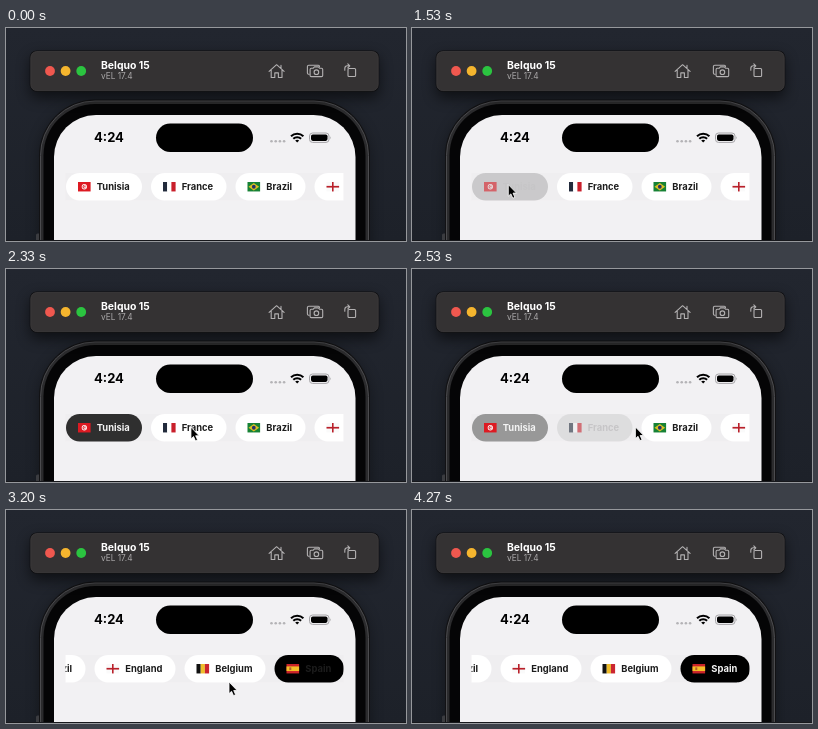
Animation of 400 by 213 pixels, one loop 5.74 s. Source, as an HTML page:

```html
<!DOCTYPE html>
<html lang="en">
<head>
<meta charset="utf-8">
<style>
  html, body { margin: 0; height: 100%; overflow: hidden; background: #20242d; }
  svg { display: block; width: 100vw; height: 100vh; font-family: Inter, "Liberation Sans", sans-serif; }
  .icon { fill: none; stroke: #b3b1b2; stroke-width: 1.1; stroke-linejoin: round; stroke-linecap: round; }
</style>
</head>
<body>
<svg viewBox="0 0 400 213">
  <defs>
    <linearGradient id="wall" x2="0" y2="1">
      <stop stop-color="#22262f"/><stop offset="1" stop-color="#1d2129"/>
    </linearGradient>
    <filter id="blur" x="-20%" y="-80%" width="140%" height="260%"><feGaussianBlur stdDeviation="7"/></filter>
    <clipPath id="list"><rect x="59.5" y="140" width="278" height="40"/></clipPath>
  </defs>
  <rect width="400" height="213" fill="url(#wall)"/>

  <!-- Phone -->
  <rect x="33" y="76" width="331" height="300" rx="55" opacity=".35" filter="url(#blur)"/>
  <rect x="30" y="205.5" width="5" height="20" rx="1.5" fill="#3b3c40"/>
  <rect x="33" y="71.5" width="331" height="300" rx="56" fill="#121214"/>
  <rect x="34.5" y="73" width="328" height="300" rx="54.5" fill="#2b2b2d" stroke="#4b4b4e"/>
  <rect x="37.5" y="76" width="322" height="300" rx="51.5" fill="#050506"/>
  <rect x="48" y="87" width="301.5" height="300" rx="42" fill="#f2f1f3"/>
  <rect x="59.5" y="145" width="278" height="27.4" fill="#efeef0"/>
  <rect x="150" y="95.5" width="97" height="28.5" rx="14.25"/>
  <text x="88" y="114.2" font-size="13" font-weight="650">4:24</text>
  <g id="dots" fill="#b4b3b6"></g>
  <g fill="none" stroke="#000" stroke-width="2">
    <path d="M285 108.2a8.8 8.8 0 0 1 12.4 0M287.3 110.8a5.6 5.6 0 0 1 7.8 0"/>
    <path d="M291.2 114.6l-2-2a2.9 2.9 0 0 1 4 0z" fill="#000" stroke="none"/>
  </g>
  <rect x="303.5" y="105" width="19.5" height="9.4" rx="3" fill="none" stroke="#a5a4a7"/>
  <rect x="305" y="106.5" width="16.5" height="6.4" rx="1.8"/>
  <path d="M324.2 108.2q1.4 1.5 0 3z" fill="#a5a4a7"/>

  <!-- Toolbar -->
  <rect x="24" y="28" width="349" height="42" rx="7" opacity=".55" filter="url(#blur)"/>
  <rect x="23.7" y="22.5" width="349.6" height="41.2" rx="7" fill="#0f0f11"/>
  <rect x="24.8" y="23.6" width="347.4" height="39" rx="6" fill="#343233" stroke="#403e3f" stroke-width=".8"/>
  <circle cx="44" cy="43" r="4.9" fill="#f0584f"/>
  <circle cx="59.6" cy="43" r="4.9" fill="#f5b52e"/>
  <circle cx="75.2" cy="43" r="4.9" fill="#2bc440"/>
  <text x="95" y="40.8" font-size="10.4" font-weight="700" fill="#fff">Belquo 15</text>
  <text x="95" y="51.3" font-size="8.3" fill="#aba9aa">vEL 17.4</text>
  <g class="icon">
    <path d="M263.1 43.3l7.5-6.6 7.5 6.6M265.2 42v7.5h3.6v-4.6h3.6v4.6h3.6V42M275 40.2v-2.8"/>
    <path d="M303.2 46.3h-.6q-1.2 0-1.2-1.2v-6.6q0-1.3 1.3-1.3h9.6q1.2 0 1.2 1.2"/>
    <path d="M305.3 40.2h2l1.1-1.3h4l1.1 1.3h2q1.2 0 1.2 1.2v6q0 1.2-1.2 1.2h-10.2q-1.2 0-1.2-1.2v-6q0-1.2 1.2-1.2z"/>
    <circle cx="310.4" cy="44.2" r="2.3"/>
    <rect x="342" y="40.5" width="7.6" height="8" rx="1"/>
    <path d="M338.8 42.2v-1.7q0-2.7 2.7-2.7h2M341.8 35.8l2 2-2 2"/>
  </g>

  <g clip-path="url(#list)"><g id="row"></g></g>
  <path id="cursor" d="M0 0V11.6L2.6 9.3 4.5 13.6 6.6 12.7 4.7 8.5H8.2Z" stroke="#fff" stroke-width=".8"/>
  <rect y="212" width="400" height="1" fill="#17181c"/>
</svg>
<script>
const LOOP = 5740, STEP = 1000 / 15;
const el = id => document.getElementById(id);
const box = (x, y, w, h, c) => `<rect x="${x}" y="${y}" width="${w}" height="${h}" fill="${c}"/>`;
const dot = (x, y, r, c) => `<circle cx="${x}" cy="${y}" r="${r}" fill="${c}"/>`;
const bars = (...colors) => colors.map((c, i) => box(i * 4.2, 0, 4.2, 9, c)).join("");
const field = c => box(0, 0, 12.6, 9, c);

const ramp = (t, from, to) => Math.min(1, Math.max(0, (t - from) / (to - from)));
const smooth = p => p * p * (3 - 2 * p);

const red = "#dd1a22";
// tap: time of the press; picked: time of the press that selects; until: next selecting press
const pills = [
  { name: "Tunisia", w: 76, tap: 1395, picked: 1395, until: 2433,
    flag: field(red) + dot(6.3, 4.5, 2.6, "#fff") + dot(6.3, 4.5, 1.8, red) +
      dot(6.9, 4.5, 1.4, "#fff") + dot(6.9, 4.5, .7, red) },
  { name: "France", w: 75.5, tap: 2433, picked: 2433, until: 3810, flag: bars("#222b3c", "#fff", "#c91f2b") },
  { name: "Brazil", w: 70, tap: 2740,
    flag: field("#178235") + '<path d="M6.3 1 11.6 4.5 6.3 8 1 4.5z" fill="#dcc022"/>' + dot(6.3, 4.5, 1.9, "#26336a") },
  { name: "England", w: 81, flag: field("#fafafa") + box(0, 3.7, 12.6, 1.6, "#b9202a") + box(5.5, 0, 1.6, 9, "#b9202a") },
  { name: "Belgium", w: 81, flag: bars("#111", "#efbd2b", "#cb2630") },
  { name: "Spain", w: 69.5, tap: 3810, picked: 3810, until: Infinity,
    flag: field("#cb2329") + box(0, 2.3, 12.6, 4.4, "#f3bf28") + box(2.8, 3.2, 2, 2.6, "#b5602c") },
];

for (let i = 0; i < 4; i++) el("dots").innerHTML += dot(265.5 + i * 4.2, 113.3, 1.3, "#b4b3b6");

let x = 60;
for (const p of pills) {
  el("row").insertAdjacentHTML("beforeend", `<g transform="translate(${x} 145)">
    <g><rect width="${p.w}" height="27.4" rx="13.7"/><text x="30.8" y="17.2" font-size="9.4" font-weight="700">${p.name}</text></g>
    <g transform="translate(12 9) scale(1 1.05)">${p.flag}</g></g>`);
  [p.body, p.mark] = el("row").lastElementChild.children;
  [p.back, p.label] = p.body.children;
  x += p.w + 9;
}

// Pointer stops: time, x, y
const stops = [
  [867, 83, 216], [1200, 93.5, 157], [1667, 97, 156.5], [1933, 150, 162], [2400, 187, 158], [2667, 260, 158],
  [2700, 260, 158], [3133, 102.5, 175], [3200, 223, 172], [3400, 291, 158], [4000, 294, 157], [4267, 306, 218],
];

function pointer(t) {
  const i = Math.max(1, stops.findIndex(s => s[0] > t));
  if (t >= stops[stops.length - 1][0]) return [306, 218];
  const [a, ax, ay] = stops[i - 1], [b, bx, by] = stops[i];
  const p = smooth(ramp(t, a, b));
  return [ax + (bx - ax) * p, ay + (by - ay) * p];
}

const pressed = (t, at) => ramp(t, at, at + 100) - ramp(t, at + 170, at + 430);
const chosen = (t, at) => ramp(t, at + 67, at + 133);

function draw(t) {
  for (const { tap, picked, until, body, mark, back, label } of pills) {
    const fade = tap ? 1 - .81 * pressed(t, tap) : 1;
    const dark = picked ? chosen(t, picked) - chosen(t, until) : 0;
    const tone = Math.round(255 - 208 * dark);
    const light = t >= picked + 150 && t < until + 150;
    body.style.opacity = fade;
    mark.style.opacity = Math.cbrt(fade);
    back.setAttribute("fill", `rgb(${tone},${tone},${tone})`);
    label.setAttribute("fill", light ? "#f4f4f4" : "#1c1c1c");
  }
  const scroll = 220 * smooth(ramp(t, 2867, 3133));
  el("row").setAttribute("transform", `translate(${-scroll})`);
  el("cursor").setAttribute("transform", `translate(${pointer(t)})`);
}

// The picture advances 15 times a second
function tick(now) {
  draw(Math.floor((now % LOOP + 4) / STEP) * STEP);
  requestAnimationFrame(tick);
}
draw(0);
requestAnimationFrame(tick);
</script>
</body>
</html>
```
